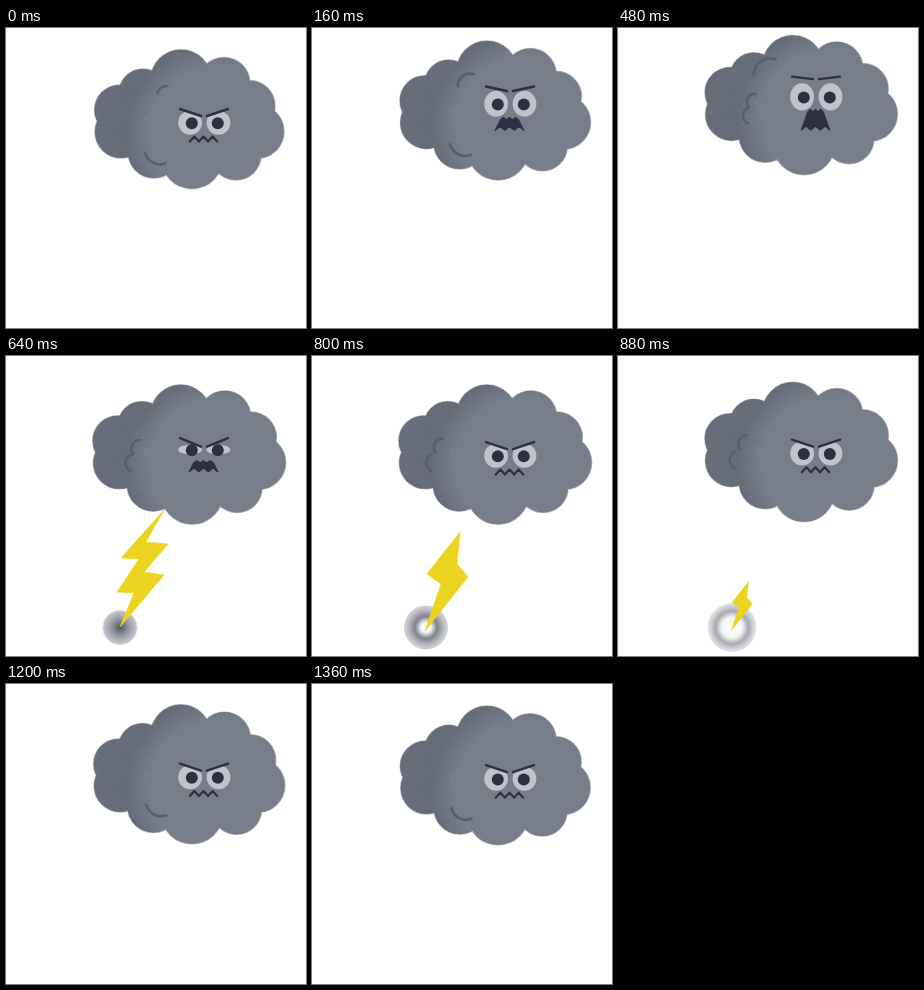
An HTML page with a canvas for the animation above (1440 ms loop, 300x300 px).

```html
<!DOCTYPE html>
<html lang="en">
<head>
<meta charset="utf-8">
<title>Angry storm cloud</title>
<style>
html, body { margin: 0; width: 100%; height: 100%; overflow: hidden; background: #fff; }
canvas { display: block; width: 100vw; height: 100vh; }
</style>
</head>
<body>
<canvas id="stage" width="300" height="300"></canvas>
<script>
const ctx = document.getElementById('stage').getContext('2d');
const LOOP = 1440, STEP = 80, STRIKE = 640, TAU = Math.PI * 2;
const INK = '#2c3042', BODY = '#777e8a', EDGE = '#b4b8c0', CREASE = '#585e6b', WHITE = '#c1c3ca', BOLT = '#ecd31f';
const CENTER = 184, FACE_X = 198;

// resting x, y and radius of each lobe, clockwise from the upper left
const lobes = [
  [113.5, 82, 25], [137, 65, 24], [175, 52, 30.3], [218, 55.5, 26], [243.5, 78, 25.5],
  [251, 103.5, 27], [230, 127, 25], [186, 130, 30.7], [148, 124, 26], [115, 104, 26]
];
const liftKeys = [[0, 0], [160, -9.5], [480, -19], [560, -19], [640, 1], [800, 1], [1040, -5], [1360, 0], [LOOP, 0]];
const gapeKeys = [[0, 0], [160, 0.55], [480, 1], [560, 1], [640, 0.45], [800, 0], [LOOP, 0]];

// arcs that drift over the cloud: lifetime, then [first, last] of x, y and radius, then angles
const creases = [
  { begin: 0, life: 560, x: [161, 151], y: [68, 66], r: [10, 18], from: 180, to: 288 },
  { begin: 400, life: 720, x: [139, 124], y: [94, 87], r: [8.5, 9], from: 143, to: 270 },
  { begin: 400, life: 720, x: [136, 113], y: [107, 104], r: [8.5, 9.5], from: 115, to: 245 },
  { begin: 960, life: 720, x: [156, 153], y: [118, 122], r: [15, 16], from: 70, to: 165 }
];

const longBolt = [[158, 154], [115, 202], [133, 203], [111, 236], [128, 237], [114, 271], [158, 219], [138, 216], [162, 188], [140, 186]];
const shortBolt = [[148, 176], [115, 218], [129, 228], [113, 275], [156, 221], [145, 208]];

const mix = (a, b, k) => a + (b - a) * k;

function sample(keys, time) {
  const i = Math.max(1, keys.findIndex(key => key[0] >= time));
  const [t0, a] = keys[i - 1], [t1, b] = keys[i];
  return mix(a, b, (time - t0) / (t1 - t0));
}

function poseAt(time) {
  const swell = Math.sin(Math.PI * time / LOOP);
  const afterStrike = time - STRIKE;
  return {
    lift: sample(liftKeys, time),
    gape: sample(gapeKeys, time),
    squint: afterStrike < 0 ? 0 : Math.max(0, 1 - afterStrike / 160),
    sag: 7 * swell ** 2,
    spread: 1 + 0.025 * swell
  };
}

function trace(points, closed) {
  ctx.beginPath();
  points.forEach(([x, y]) => ctx.lineTo(x, y));
  if (closed) ctx.closePath();
}

function pen(color, width) {
  ctx.strokeStyle = color;
  ctx.lineWidth = width;
  ctx.lineCap = ctx.lineJoin = 'round';
}

function oval(x, y, rx, ry, color) {
  ctx.beginPath();
  ctx.ellipse(x, y, rx, ry, 0, 0, TAU);
  ctx.fillStyle = color;
  ctx.fill();
}

function drawSplash(time) {
  const age = (time - STRIKE) / 320;
  if (age < 0 || age > 1) return;
  const outer = 18 + 9 * age, hole = 17 * age ** 1.8, peak = 22 * age;
  const alpha = 0.95 - 0.75 * age ** 1.6;
  const glow = ctx.createRadialGradient(114, 271.5, 0, 114, 271.5, outer);
  const stop = (at, a) => glow.addColorStop(at, `rgba(72,76,92,${a})`);
  stop(0, age ? 0 : alpha);
  stop(hole / outer, age ? 0.05 : alpha);
  stop(peak / outer, alpha);
  stop(mix(peak / outer, 1, 0.55), alpha * 0.55);
  stop(mix(peak / outer, 1, 0.9), alpha * 0.35);
  stop(1, 0);
  oval(114, 271.5, outer, outer, glow);
}

function drawBolt(time) {
  if (time < STRIKE || time > 880) return;
  ctx.save();
  const size = time > 800 ? 0.5 : 1;
  ctx.translate(113, 275);
  ctx.scale(size, size);
  ctx.translate(-113, -275);
  trace(time < 800 ? longBolt : shortBolt, true);
  ctx.fillStyle = BOLT;
  pen(BOLT, 0.6);
  ctx.fill();
  ctx.stroke();
  ctx.restore();
}

function drawCrease({ begin, life, x, y, r, from, to }, time, lift) {
  const u = ((time - begin + LOOP) % LOOP) / life;
  if (u > 1) return;
  const grown = Math.min(1, 0.7 + 6 * Math.min(u, 1 - u));
  const middle = (from + to) / 2, sweep = (to - from) / 2 * grown;
  ctx.beginPath();
  ctx.arc(mix(...x, u), mix(...y, u) + lift, mix(...r, u), (middle - sweep) * TAU / 360, (middle + sweep) * TAU / 360);
  pen(CREASE, 2.6);
  ctx.stroke();
}

function drawTexture(y) {
  let seed = 17;
  const random = () => (seed = seed * 16807 % 2147483647) / 2147483647;
  for (let i = 0; i < 150; i++) {
    const x = 88 + random() * 55, top = y - 50 + random() * 90;
    trace([[x, top], [x + 3, top - 4 * random()]]);
    pen(i % 2 ? 'rgba(130,136,148,.13)' : 'rgba(70,75,88,.1)', 1);
    ctx.stroke();
  }
}

function drawShade(y) {
  ctx.save();
  ctx.translate(215, y);
  ctx.scale(85, 80);
  const shade = ctx.createRadialGradient(0, 0, 0.84, 0, 0, 1.55);
  shade.addColorStop(0, 'rgba(94,99,112,0)');
  shade.addColorStop(0.4, 'rgba(94,99,112,.68)');
  shade.addColorStop(1, 'rgba(94,99,112,.62)');
  ctx.fillStyle = shade;
  ctx.fillRect(-2, -2, 4, 4);
  ctx.restore();
}

function drawCloud(time, { lift, sag, spread }) {
  const outline = new Path2D(), core = new Path2D();
  for (const [x, y, r] of lobes) {
    const cx = CENTER + (x - CENTER) * spread;
    const cy = y + lift + sag * (1 - Math.abs(x - CENTER) / 95);
    outline.moveTo(cx + r, cy);
    outline.arc(cx, cy, r, 0, TAU);
    core.lineTo(cx, cy);
  }
  pen(EDGE, 1.4);
  ctx.stroke(outline);
  ctx.fillStyle = BODY;
  ctx.fill(outline);
  ctx.fill(core);

  ctx.save();
  ctx.clip(outline);
  drawShade(105 + lift + sag / 2);
  drawTexture(105 + lift);
  ctx.restore();
  creases.forEach(crease => drawCrease(crease, time, lift));
}

function drawEye(side, y, { gape, squint }) {
  const browIn = y - 7 - 11 * gape + 8.5 * squint;
  const browOut = y - 14 - 6.5 * gape + 5 * squint;
  const browAt = d => [FACE_X + side * d, mix(browIn, browOut, (d - 3) / 21)];
  ctx.save();
  trace([browAt(0), browAt(35), [FACE_X + side * 35, y + 25], [FACE_X, y + 25]], true);
  ctx.clip();
  oval(FACE_X + 0.3 + side * 14.2, y - 0.3, 11.9, 12 + 1.7 * gape - 8 * squint, WHITE);
  ctx.restore();
  oval(FACE_X + 0.8 + side * 13, y + 0.3, 6, 6, INK);
  trace([browAt(3), browAt(24)]);
  pen(INK, 2.4);
  ctx.stroke();
}

const zigzag = (y, halfWidth, swing) =>
  Array.from({ length: 7 }, (_, i) => [FACE_X - 0.5 + (i / 3 - 1) * halfWidth, y + (i % 2 ? -swing : swing)]);

function drawMouth(y, gape) {
  const top = zigzag(y, 13.7 - 6 * Math.min(1, 1.4 * gape), gape ? 1.2 : 2.5);
  const bottom = gape ? zigzag(y + 17.5 * gape, 14.2, 2).reverse() : [];
  trace([...top, ...bottom], gape > 0);
  pen(INK, gape ? 1.2 : 2.2);
  ctx.fillStyle = INK;
  if (gape) ctx.fill();
  ctx.stroke();
}

function drawFace(pose) {
  const { lift, sag, gape, squint } = pose;
  const y = 95 + lift + 0.6 * sag - Math.min(10, 18 * gape) + 2 * squint;
  [-1, 1].forEach(side => drawEye(side, y, pose));
  drawMouth(y + 16 - 2.5 * gape - 3 * squint, gape);
}

function render(now) {
  const time = Math.floor(now % LOOP / STEP) * STEP;
  const pose = poseAt(time);
  ctx.fillStyle = '#fff';
  ctx.fillRect(0, 0, 300, 300);
  drawSplash(time);
  drawBolt(time);
  drawCloud(time, pose);
  drawFace(pose);
}

let start;
function tick(now) {
  start ??= now;
  render(now - start);
  requestAnimationFrame(tick);
}
render(0);
requestAnimationFrame(tick);
</script>
</body>
</html>
```
